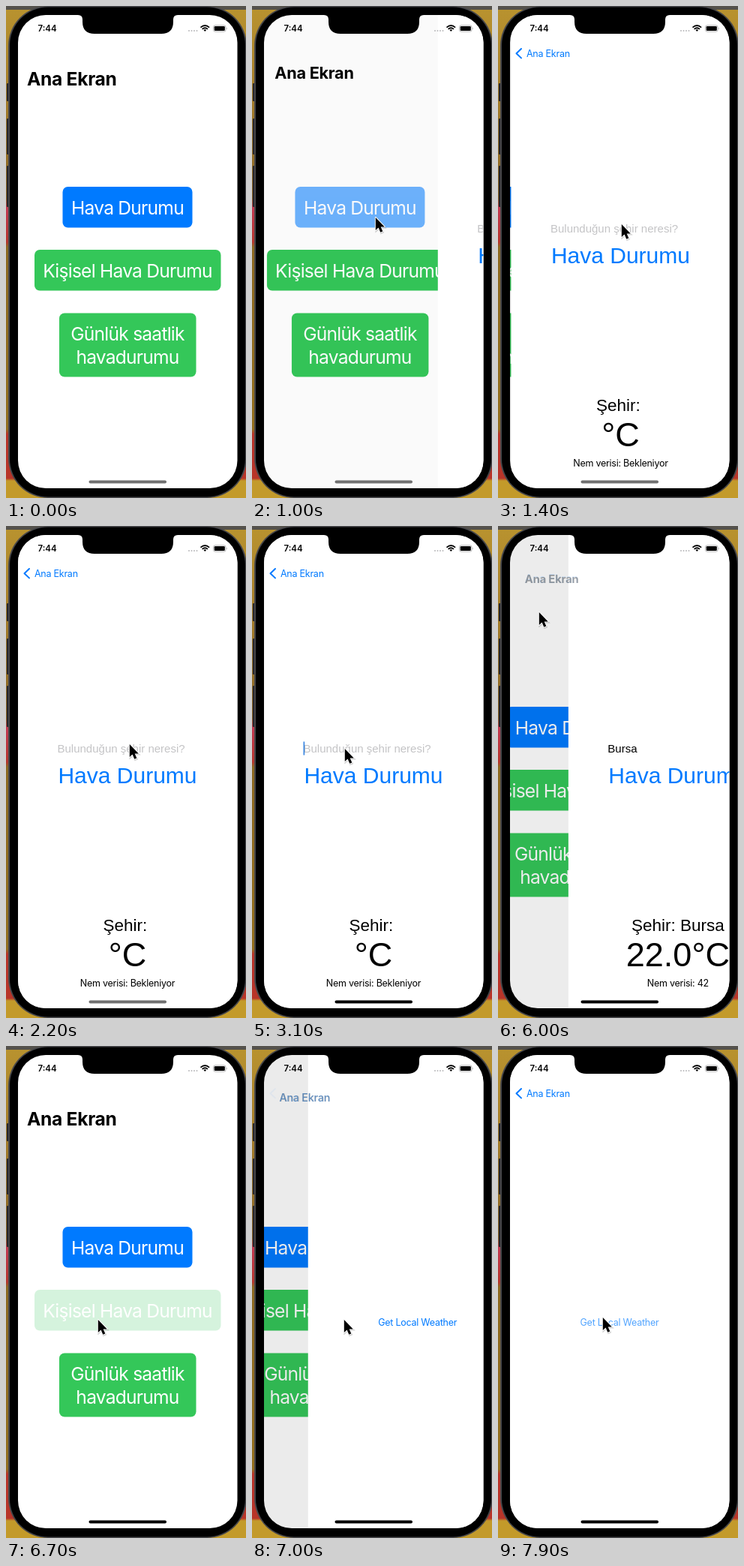
An HTML page for the animation above (8000 ms loop, 320 by 656 pixels).

```html
<!DOCTYPE html>
<html lang="tr">
<head>
<meta charset="utf-8">
<title>Hava Durumu</title>
<style>
html, body { margin: 0; width: 100%; height: 100%; overflow: hidden; background: #b48b2b; }
svg { display: block; width: 320px; height: 656px; }
text { font-family: Inter, Roboto, sans-serif; font-optical-sizing: none; white-space: pre; }
.mid { text-anchor: middle; }
.body { font-size: 12.5px; letter-spacing: -.02em; }
.btn { font-size: 24.6px; letter-spacing: -.0315em; fill: #fff; text-anchor: middle; }
.title { font-weight: 700; letter-spacing: -.012em; }
.helv { font-family: "Liberation Sans", Arial, sans-serif; }
.blue { fill: #007aff; }
</style>
</head>
<body>
<svg viewBox="0 0 320 656" xmlns="http://www.w3.org/2000/svg">
  <defs>
    <clipPath id="screen"><rect x="16" y="12" width="292.5" height="631" rx="37"/></clipPath>
    <linearGradient id="wall" x1="0" y1="0" x2="0" y2="1">
      <stop offset="0" stop-color="#b9932f"/>
      <stop offset=".15" stop-color="#a9822c"/>
      <stop offset=".39" stop-color="#8a6628"/>
      <stop offset=".41" stop-color="#c23b52"/>
      <stop offset=".48" stop-color="#b5372f"/>
      <stop offset=".49" stop-color="#8d6a22"/>
      <stop offset=".86" stop-color="#94701f"/>
      <stop offset=".87" stop-color="#b8352a"/>
      <stop offset=".96" stop-color="#b8352a"/>
      <stop offset=".965" stop-color="#c39a2a"/>
      <stop offset="1" stop-color="#c39a2a"/>
    </linearGradient>
  </defs>

  <rect width="320" height="656" fill="url(#wall)"/>
  <rect width="320" height="5" fill="#55524c"/>
  <g fill="#25252a">
    <rect x="1" y="103" width="4" height="24" rx="1"/>
    <rect x="1" y="150" width="4" height="48" rx="1"/>
    <rect x="1" y="213" width="4" height="55" rx="1"/>
  </g>
  <rect x="3" y="0" width="318" height="656" rx="53" fill="#47474a"/>
  <rect x="5" y="1.5" width="314" height="653" rx="51" fill="#000"/>

  <g clip-path="url(#screen)">
    <rect x="16" y="12" width="293" height="631" fill="#fff"/>
    <g id="home">
      <g id="btn1">
        <rect x="75.500" y="241" width="173" height="54.500" rx="7" fill="#007aff"/>
        <text class="btn" x="162" y="277.500">Hava Durumu</text>
      </g>
      <g id="btn2">
        <rect x="38" y="325" width="248.500" height="54.500" rx="7" fill="#34c759"/>
        <text class="btn" x="162" y="361.500">Kişisel Hava Durumu</text>
      </g>
      <rect x="71" y="409.500" width="182.500" height="85" rx="7" fill="#34c759"/>
      <text class="btn" x="162" y="446">Günlük saatlik</text>
      <text class="btn" x="162" y="476.500">havadurumu</text>
    </g>
    <rect id="dim" x="16" y="12" width="293" height="631"/>

    <g id="detail">
      <rect x="16" y="12" width="293" height="631" fill="#fff"/>
      <text id="hint" class="helv" x="68.500" y="301.500" font-size="15" fill="#c4c4c6">Bulunduğun şehir neresi?</text>
      <text id="field" class="helv" x="68.500" y="301.500" font-size="15"></text>
      <rect id="caret" y="287.500" width="1.500" height="18" fill="#2a7de1"/>
      <text id="ask" class="helv mid blue" x="162" y="343" font-size="30">Hava Durumu</text>
      <text id="city" class="helv mid" x="162" y="539.500" font-size="22.500"></text>
      <text id="temp" class="helv mid" x="162" y="586.500" font-size="45"></text>
      <text id="humid" class="mid body" x="162" y="614"></text>
    </g>

    <g id="local">
      <rect x="16" y="12" width="293" height="631" fill="#fff"/>
      <text id="get" class="mid body blue" x="162" y="372.500">Get Local Weather</text>
    </g>

    <path id="chevron" d="M31 57 L24.500 63.200 L31 69.400" fill="none" stroke="#007aff" stroke-width="2" stroke-linecap="round" stroke-linejoin="round"/>
    <text id="back" class="blue" letter-spacing="-.25">Ana Ekran</text>
    <text id="title" class="title">Ana Ekran</text>

    <text x="42.500" y="34" font-size="11.400" font-weight="600">7:44</text>
    <g fill="#b9b9bb">
      <circle cx="244" cy="33" r="1"/><circle cx="247.500" cy="33" r="1"/>
      <circle cx="251" cy="33" r="1"/><circle cx="254.500" cy="33" r="1"/>
    </g>
    <g fill="none" stroke="#000" stroke-width="1.700">
      <path d="M259.500 28.600 Q265.300 23.400 271.100 28.600"/>
      <path d="M261.600 30.900 Q265.300 27.600 269 30.900"/>
      <path d="M263.500 32.100 Q265.300 30.600 267.100 32.100 L265.300 34 Z" fill="#000" stroke="none"/>
    </g>
    <rect x="276.500" y="25.800" width="16.500" height="8.400" rx="2.400" fill="none" stroke="#a2a2a4" stroke-width=".8"/>
    <rect x="277.700" y="27" width="14.100" height="6" rx="1.300"/>
    <path d="M294 28.500 Q295.600 30 294 31.500 Z" fill="#a2a2a4"/>
    <rect id="bar" x="110.500" y="632.500" width="103.500" height="4" rx="2"/>
  </g>
  <path d="M96 10 H229 V12 Q223 12 223 18 V21 Q223 37 207 37 H118 Q102 37 102 21 V18 Q102 12 96 12 Z"/>

  <g id="cursor">
    <path d="M.8 1 V18 L4.600 14.500 L7.300 20.800 L10.300 19.500 L7.700 13.400 H12.800 Z" transform="translate(.6 1.200)" opacity=".18" stroke="#000" stroke-width="2"/>
    <path d="M.8 1 V18 L4.600 14.500 L7.300 20.800 L10.300 19.500 L7.700 13.400 H12.800 Z" stroke="#fff" stroke-width="1.800" stroke-linejoin="round" paint-order="stroke"/>
  </g>
</svg>

<script>
const LOOP = 8000, WIDTH = 292;
const PUSH = 950, POP = 5940, PUSH2 = 6820, RESULT = 4900;
const el = {};
document.querySelectorAll('svg [id]').forEach(n => el[n.id] = n);

const clamp = x => Math.min(1, Math.max(0, x));
const mix = (a, b, k) => a + (b - a) * k;
const ramp = (t, a, b) => clamp((t - a) / (b - a));
const ease = x => x * x * (3 - 2 * x);
const set = (n, o) => { for (const k in o) n.setAttribute(k, o[k]); };
const show = (n, on) => n.style.display = on ? '' : 'none';
const write = (n, s) => { if (n.textContent !== s) n.textContent = s; };

// critically damped navigation spring
const spring = ms => {
  const x = Math.max(0, ms) * .0165;
  return 1 - (1 + x) * Math.exp(-x);
};
const press = (t, down, up) =>
  1 - .8 * ramp(t, down, down + 70) * (1 - ramp(t, up, up + 220));

// time, x, y
const route = [
  [100, 318, 420], [700, 164, 281], [1000, 164, 281], [1350, 164, 290],
  [2300, 164, 290], [2950, 123, 296], [4350, 123, 296], [4600, 160, 336],
  [5000, 160, 336], [5700, 36, 67], [5880, 37, 68], [6000, 54, 114],
  [6560, 122, 364], [7400, 122, 364], [7850, 139, 361], [8000, 139, 361]
];
function pointer(t) {
  let i = 1;
  while (i < route.length - 1 && t > route[i][0]) i++;
  const [t0, x0, y0] = route[i - 1], [t1, x1, y1] = route[i];
  const k = ease(ramp(t, t0, t1));
  return [mix(x0, x1, k), mix(y0, y1, k)];
}

const keys = [3500, 3900, 4100, 4250, 4400];

function draw(t) {
  const second = t >= PUSH2;
  const away = second ? spring(t - PUSH2)
    : t >= POP ? 1 - spring(t - POP) : spring(t - PUSH);

  set(el.home, { transform: `translate(${-.3 * WIDTH * away} 0)` });
  set(el.dim, { opacity: .1 * away });
  set(el.btn1, { opacity: press(t, 780, 900) });
  set(el.btn2, { opacity: press(t, 6600, 6760) });

  const slide = `translate(${WIDTH * (1 - away)} 0)`;
  set(el.detail, { transform: slide });
  set(el.local, { transform: slide });
  show(el.detail, !second && away > .0005);
  show(el.local, second);

  // back label and large title morph into each other
  const r = Math.pow(1 - away, 1.15);
  const place = { x: mix(38, 28, r), y: mix(67.5, 106, r) };
  const tap = 1 - .6 * ramp(t, 5820, 5880) * (t < PUSH2);
  set(el.back, { ...place, 'font-size': mix(12.5, 25.5, r), opacity: Math.pow(1 - r, 4) * tap });
  set(el.title, { ...place, 'font-size': mix(12, 24.6, r), opacity: clamp(r * 1.5) });
  set(el.chevron, { opacity: clamp(1 - 6 * r) * tap });

  const typed = 'Bursa'.slice(0, keys.filter(k => t >= k).length);
  write(el.field, typed);
  show(el.hint, !typed);
  show(el.caret, t >= 3050 && t < 5100);
  set(el.caret, { x: 68.6 + (typed ? el.field.getComputedTextLength() : 0) });
  set(el.ask, { opacity: press(t, 4610, 4760) });

  const done = t >= RESULT;
  write(el.city, 'Şehir: ' + (done ? 'Bursa' : '\u00a0').trimStart() + (done ? '' : '\u200b'));
  write(el.temp, done ? '22.0°C' : '°C');
  write(el.humid, 'Nem verisi: ' + (done ? '42' : 'Bekleniyor'));

  set(el.get, { opacity: 1 - .32 * ramp(t, 7800, 7900) });
  const g = Math.round(112 * (1 - ramp(t, 2600, 2950)));
  set(el.bar, { fill: `rgb(${g},${g},${g})` });

  const [x, y] = pointer(t);
  show(el.cursor, t >= 100 && !(t >= 3500 && t < 4350));
  set(el.cursor, { transform: `translate(${x} ${y})` });
}

const start = performance.now();
function tick() {
  draw((performance.now() - start) % LOOP);
  requestAnimationFrame(tick);
}
tick();
</script>
</body>
</html>
```
